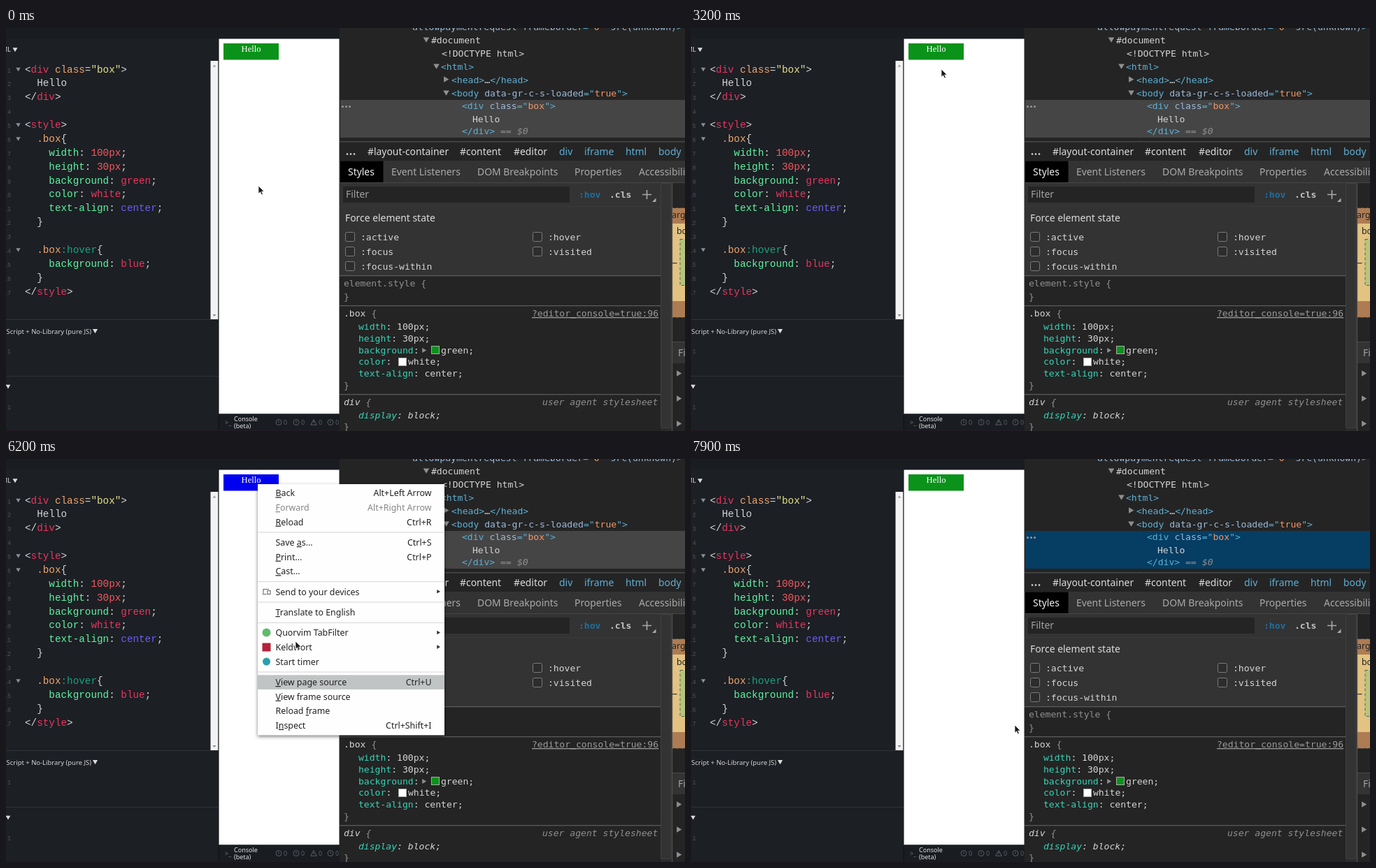
These frames come from a looping animation (971x577 px, 8000 ms). An HTML page:

```html
<!DOCTYPE html>
<html lang="en">
<head>
<meta charset="utf-8">
<title>Forcing a hover state</title>
<style>
html, body { margin: 0; width: 100%; height: 100%; overflow: hidden; background: #1c1f24; }
svg { display: block; width: 100%; height: 100%; }
text { white-space: pre; }
.code { font: 14.3px "Liberation Mono", monospace; }
.mono { font: 13.08px "DejaVu Sans Mono", monospace; }
.ui { font: 13.9px "Noto Sans", sans-serif; }
.menu { font: 12.4px "Noto Sans", sans-serif; }
.tiny { font: 9px "Noto Sans", sans-serif; }
.head { font: 9.45px "Noto Sans", sans-serif; }
.num { font: 8.5px "Liberation Mono", monospace; }
.serif { font: 12.6px "Liberation Serif", serif; }
.i { font-style: italic; }
.b { font-weight: bold; }
.u { text-decoration: underline; }
</style>
</head>
<body>
<svg id="stage" viewBox="0 0 971 577" preserveAspectRatio="none"></svg>
<script>
const LOOP = 8000, TICK = 100;
const stage = document.getElementById('stage');
let parent = stage;

function el(name, attrs, text) {
  const node = document.createElementNS('http://www.w3.org/2000/svg', name);
  for (const key in attrs) node.setAttribute(key, attrs[key]);
  if (text !== undefined) node.textContent = text;
  parent.appendChild(node);
  return node;
}
const group = attrs => (parent = el('g', attrs));
const leave = () => { parent = stage; };
const rect = (x, y, w, h, fill, more) => el('rect', { x, y, width: w, height: h, fill, ...more });
const path = (d, fill, more) => el('path', { d, fill, ...more });
const label = (x, y, cls, fill, text, more) => el('text', { x, y, class: cls, fill, ...more }, text);
const down = (x, y, r, fill) => path(`M${x - r} ${y - r * .8}h${2 * r}l${-r} ${r * 1.7}z`, fill);
const right = (x, y, r, fill) => path(`M${x - r * .8} ${y - r}v${2 * r}l${r * 1.7} ${-r}z`, fill);

// Runs are split by "~"; the first letter of a run picks its colour.
const INK = {
  w: '#d4d4d4', p: '#e9355f', o: '#f0a56b', y: '#e5e08a', g: '#5ff3a0', r: '#f2595f',
  v: '#6c5cf6', h: '#1aa27f', t: '#5db0d7', a: '#9bbbdc', s: '#f29766', c: '#35d4b8',
  d: '#8f8f8f'
};
function runs(x, y, cls, source) {
  const outer = parent;
  parent = el('text', { x, y, class: cls });
  for (const run of source.split('~')) el('tspan', { fill: INK[run[0]] }, run.slice(1));
  parent = outer;
}

function drawEditor() {
  rect(0, 0, 477, 577, '#1c1f24');
  rect(0, 0, 477, 15, '#191c21');
  label(7, 34, 'tiny', '#ddd', 'HTML', { 'text-anchor': 'end' });
  down(13, 31, 3.5, '#ddd');

  const lines = [
    'w<~pdiv~w ~oclass~w=~y"box"~w>', 'w  Hello', 'w</~pdiv~w>', 'w',
    'w<~pstyle~w>', 'w  ~o.box~w{', 'w    ~gwidth~w: ~r100px~w;', 'w    ~gheight~w: ~r30px~w;',
    'w    ~gbackground~w: ~pgreen~w;', 'w    ~gcolor~w: ~pwhite~w;', 'w    ~gtext-align~w: ~vcenter~w;',
    'w  }', 'w', 'w  ~o.box~h:hover~w{', 'w    ~gbackground~w: ~pblue~w;', 'w  }', 'w</~pstyle~w>'
  ];
  const num = (y, n) => label(7, y, 'num', '#4d535b', n, { 'text-anchor': 'end' });
  lines.forEach((line, i) => {
    const y = 63.6 + i * 19.87;
    num(y, i + 1);
    runs(27, y, 'code', line);
    if ([0, 4, 5, 13].includes(i)) down(17.5, y - 4.2, 3.2, '#8b9096');
  });

  rect(292.5, 47, 11, 370, '#f3f3f3');
  path('M295.5 55.5h5l-2.5-3z', '#a0a0a0');
  path('M295.5 410h5l-2.5 3z', '#8a8a8a');

  rect(0, 417, 305, 1, '#30343a');
  label(122, 437.5, 'head', '#d5d5d5', 'JavaScript + No-Library (pure JS)', { 'text-anchor': 'end' });
  down(127.5, 434, 3.6, '#ddd');
  num(466, 1);
  rect(0, 498, 305, 1, '#30343a');
  down(3, 513.5, 3.3, '#ddd');
  num(546, 1);

  rect(303.5, 15, 1.5, 562, '#111417');
  rect(304.5, 15.5, 172, 537, '#fff');
  rect(305, 552.5, 172, 24.5, '#191c21');
  label(313, 568, 'tiny', '#777d84', '>_');
  label(326, 563, 'tiny', '#e4e4e4', 'Console');
  label(326, 572.5, 'tiny', '#e4e4e4', '(beta)');
  [390, 415, 440, 464].forEach((x, i) => {
    const line = { stroke: '#5b6066', 'stroke-width': 1 };
    if (i === 2) path(`M${x} 560.5l4.3 7.7h-8.6z`, 'none', line);
    else el('circle', { cx: x, cy: 564.5, r: 4, fill: 'none', ...line });
    path(`M${x} 562.5v3`, 'none', line);
    label(x + 7, 568, 'tiny', '#5b6066', '0');
  });
  rect(0, 575.5, 477, 1.5, '#231a25');
}

function drawTree() {
  rect(477, 0, 494, 577, '#242424');
  const selected = rect(478, 103, 493, 54, '#454545');
  runs(581, 3, 'mono', 'aallowpaymentrequest frameborder~t="~s0~t" ~asrc(unknown)~t>');
  runs(608, 22, 'mono', 'w#document');
  runs(623, 40.5, 'mono', 'w<!DOCTYPE html>');
  runs(622, 59.5, 'mono', 't<html>');
  runs(637, 78.5, 'mono', 't<head>~w…~t</head>');
  runs(637, 97.5, 'mono', 't<body ~adata-gr-c-s-loaded~t="~strue~t">');
  runs(652, 116, 'mono', 't<div ~aclass~t="~sbox~t">');
  runs(667, 134.5, 'mono', 'wHello');
  runs(652, 152, 'mono', 't</div>');
  runs(707, 152, 'mono', 'd==');
  runs(731, 152, 'mono i', 'd$0');
  runs(652, 170.5, 'mono', 't<style>~w…~t</style>');
  right(644.5, 165.5, 4, '#8f8f8f');
  down(601, 17, 4.3, '#8f8f8f');
  down(615.5, 55, 4.3, '#8f8f8f');
  right(629.5, 73.5, 4.3, '#8f8f8f');
  down(629.5, 93, 4.3, '#8f8f8f');
  [481.5, 486.5, 491.5].forEach(cx => el('circle', { cx, cy: 112.5, r: 1.5, fill: '#999' }));

  rect(477, 162, 494, 28, '#242424');
  rect(477, 162, 494, 1.5, '#494949');
  [488, 493, 498].forEach(cx => el('circle', { cx, cy: 180.5, r: 1.3, fill: '#ddd' }));
  [[517, '#layout-container'], [649, '#content'], [726, '#editor']]
    .forEach(([x, text]) => label(x, 181.5, 'ui', '#ddd', text));
  [[791, 'div'], [827, 'iframe'], [886, 'html'], [933, 'body']]
    .forEach(([x, text]) => label(x, 181.5, 'ui', INK.t, text));
  return selected;
}

function drawStyles() {
  rect(477, 190, 494, 32, '#333');
  rect(478, 190.5, 61.5, 30.5, '#000');
  label(489, 211, 'ui', '#f0f0f0', 'Styles');
  [[551, 'Event Listeners'], [674, 'DOM Breakpoints'], [813, 'Properties'], [905, 'Accessibility']]
    .forEach(([x, text]) => label(x, 211, 'ui', '#aaa', text));
  rect(477, 221, 494, 1, '#474747');

  rect(477, 222, 459, 132, '#333');
  rect(482, 227, 324, 23, '#242424');
  label(486, 243, 'ui', '#a2a2a2', 'Filter');
  label(819, 242.5, 'mono b', '#1f6f9f', ':hov');
  label(863, 242.5, 'mono b', '#c3c3c3', '.cls');
  path('M910 238.5h13M916.5 232v13', 'none', { stroke: '#aaa', 'stroke-width': 1.6 });
  path('M929.5 243.5v5.5h-5.5z', '#aaa');
  rect(477, 255, 459, 1, '#3a3a3a');
  label(485, 277, 'ui', '#dcdcdc', 'Force element state');
  const check = (x, y, text) => {
    rect(x + .5, y + .5, 13, 13, '#2d2d2d', { rx: 2, stroke: '#7b7b7b' });
    runs(x + 22, y + 11.5, 'mono', 'w' + text);
  };
  check(485, 292, ':active');
  check(485, 313, ':focus');
  check(485, 334, ':focus-within');
  check(753, 292, ':hover');
  check(753, 313, ':visited');

  [354, 397, 524].forEach(y => rect(477, y, 459, 1.3, '#5a5a5a'));
  runs(483, 370, 'mono', 'delement.style {');
  runs(483, 388.5, 'mono', 'd}');
  runs(483, 413, 'mono', 'w.box ~d{');
  label(752, 413, 'mono u', '#9a9a9a', '?editor_console=true:96');
  runs(504, 432, 'mono', 'cwidth~w: 100px;');
  runs(504, 449, 'mono', 'cheight~w: 30px;');
  runs(504, 465.5, 'mono', 'cbackground~w:');
  right(598, 461.5, 3.5, '#8f8f8f');
  rect(608.5, 455.5, 11, 11, '#0a921a', { stroke: '#aaa' });
  runs(622, 465.5, 'mono', 'wgreen;');
  runs(504, 482, 'mono', 'ccolor~w:');
  rect(561.5, 472.5, 11, 11, '#fff', { stroke: '#aaa' });
  runs(575, 482, 'mono', 'wwhite;');
  runs(504, 499, 'mono', 'ctext-align~w: center;');
  runs(483, 515.5, 'mono', 'd}');
  runs(483, 539.5, 'mono i', 'wdiv ~d{');
  runs(767, 539.5, 'mono i', 'duser agent stylesheet');
  runs(504, 558.5, 'mono i', 'cdisplay~w: block;');
  runs(483, 574.5, 'mono', 'd}');
}

function drawBoxModel() {
  const dash = { stroke: '#333', 'stroke-dasharray': '4 3' };
  rect(940.5, 257.5, 60, 157, '#ae7c53', dash);
  rect(945, 280, 60, 111, '#e2c382');
  rect(964, 302.5, 40, 66, '#b7c37f', { ...dash, stroke: '#4d6a55' });
  label(952, 272, 'menu', '#222', 'argin');
  label(959, 294.5, 'menu', '#222', 'bo');
  rect(953, 336, 6.5, 1.2, '#333');
  rect(953, 449, 18, 1, '#4a4a4a');
  rect(953, 450, 18, 30, '#333');
  label(961, 470, 'ui', '#a2a2a2', 'Filter');
  [494.5, 530.5, 566.5].forEach(y => right(962.5, y, 4.2, '#8f8f8f'));

  rect(936, 222, 16, 355, '#2b2b2b');
  rect(936.5, 222.5, 14.5, 350, '#333', { stroke: '#404040', rx: 1 });
  rect(952, 222, 1.2, 355, '#505050');
}

// "_" underlines the next letter, "-" starts a new section, ">" marks a submenu.
const MENU = [
  ['_Back', 'Alt+Left Arrow'], ['_Forward', 'Alt+Right Arrow'], ['_Reload', 'Ctrl+R'], '-',
  ['Save _as…', 'Ctrl+S'], ['_Print…', 'Ctrl+P'], ['_Cast…'], '-',
  ['Send to your devices', '>'], '-', ['_Translate to English'], '-',
  ['Quorvim TabFilter', '>'], ['Keldwort', '>'], ['Start timer'], '-',
  ['_View page source', 'Ctrl+U'], ['_View frame source'], ['Reload _frame'], ['I_nspect', 'Ctrl+Shift+I']
];
const rowY = [];

function drawMenu() {
  const menu = group({ style: 'filter:drop-shadow(0 2px 2.5px rgba(0,0,0,.5))' });
  rect(360, 36, 267, 359.5, '#fefefe');
  const hover = rect(360, 0, 267, 20.6, '#c1c4c5');
  let y = 49;
  for (const item of MENU) {
    if (item === '-') {
      rect(360, y - 6.3, 267, 1, '#d6d6d6');
      y += 8.8;
      continue;
    }
    const [name, key] = item;
    const fill = name === '_Forward' ? '#868686' : '#222';
    const mark = name.indexOf('_');
    const row = label(385.5, y + 4.4, 'menu', fill, mark < 0 ? name : name.slice(0, mark));
    if (mark >= 0) {
      parent = row;
      el('tspan', { class: 'u' }, name[mark + 1]);
      el('tspan', {}, name.slice(mark + 2));
      parent = menu;
    }
    if (key === '>') right(618.5, y - .5, 2.8, '#333');
    else if (key) label(608.5, y + 4.4, 'menu', fill, key, { 'text-anchor': 'end' });
    rowY.push(y);
    y += 20.6;
  }
  path('M368 192.5v-6h8M366.5 193.5h6M374 188.5h4v5h-4z', 'none', { stroke: '#666', 'stroke-width': 1.1 });
  el('circle', { cx: 372.5, cy: 248.5, r: 6, fill: '#5fbb6c' });
  rect(366.5, 263.5, 12, 12, '#b4223b');
  el('circle', { cx: 372.5, cy: 290, r: 5.5, fill: '#2c9fae' });
  leave();
  return [menu, hover];
}

drawEditor();
const box = rect(311, 22, 79, 23.5, '#0a921a');
label(350.6, 34, 'serif', '#fff', 'Hello', { 'text-anchor': 'middle' });
const selected = drawTree();
drawStyles();
drawBoxModel();
const [menu, hover] = drawMenu();
const cursor = path('M0 0V11.2L2.6 8.8 4.4 12.8 6.3 12 4.6 8.1H8z', '#1a1a1a', { stroke: '#fff', 'stroke-width': .7 });

// Pointer moves: first step, last step (in ticks), x, y reached.
const START = [361, 226];
const MOVES = [
  [7, 8, 358, 150], [9, 10, 352, 55], [11, 12, 350, 33],
  [16, 16, 353, 45], [17, 18, 384, 67], [19, 20, 378, 62],
  [23, 24, 358, 34], [26, 28, 362, 67],
  [32, 32, 358, 59], [33, 34, 348, 34], [35, 35, 366, 71], [36, 36, 381, 65],
  [40, 40, 345, 43], [46, 46, 337, 56], [47, 48, 340, 36], [49, 51, 351, 28],
  [54, 54, 354, 35], [59, 60, 375, 110], [61, 62, 414, 261],
  [63, 64, 429, 345], [65, 67, 432, 378], [76, 79, 463, 381]
];
const HOVERED = [[10, 16], [23, 26], [33, 35], [47, 71]];
const ROWS = [[59, 0], [60, 4], [61, 8], [62, 11], [63, 13], [64, 14]];

function pointer(tick) {
  let [x, y] = START;
  for (const [from, to, nx, ny] of MOVES) {
    if (tick < from) break;
    const k = Math.min(1, (tick - from + 1) / (to - from + 1));
    x += (nx - x) * k;
    y += (ny - y) * k;
  }
  return [x, y];
}

function draw() {
  const tick = Math.floor(performance.now() % LOOP / TICK);
  const [x, y] = pointer(tick);
  cursor.setAttribute('transform', `translate(${x} ${y})`);
  const blue = HOVERED.some(([from, to]) => tick >= from && tick < to);
  box.setAttribute('fill', blue ? '#0000f0' : '#0a921a');
  menu.setAttribute('visibility', tick >= 54 && tick < 71 ? 'visible' : 'hidden');
  const row = ROWS.filter(([from]) => tick >= from).pop();
  hover.setAttribute('y', row ? rowY[row[1]] - 10.3 : 40);
  hover.setAttribute('opacity', row ? 1 : 0);
  selected.setAttribute('fill', tick >= 72 ? '#053d63' : '#454545');
  requestAnimationFrame(draw);
}
draw();
</script>
</body>
</html>
```
